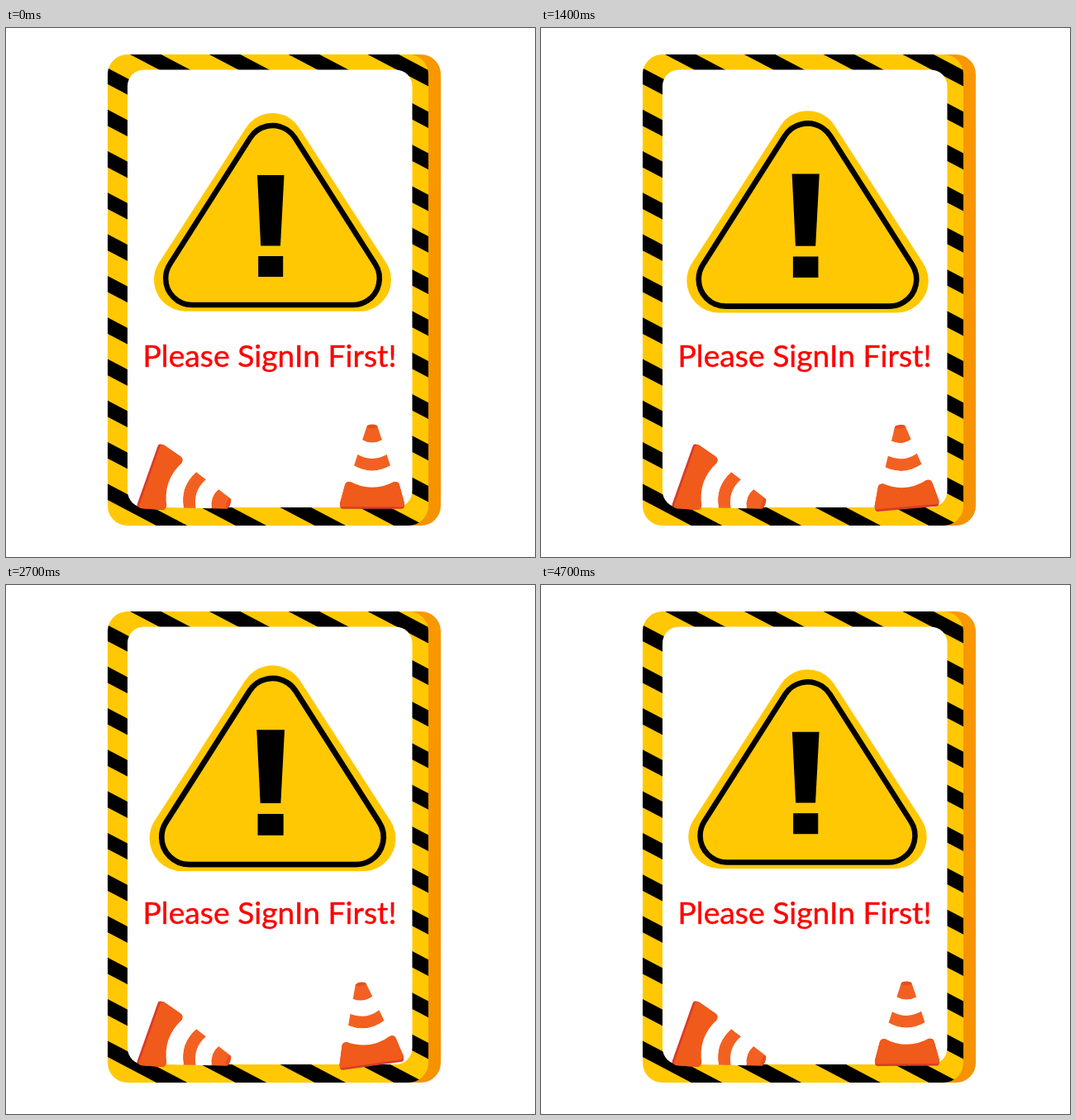
An HTML page with a canvas for the animation above (4.8 s loop, 640 by 640 pixels).

```html
<!DOCTYPE html>
<html lang="en">
<head>
<meta charset="utf-8">
<title>Please SignIn First!</title>
<style>
  html, body { margin: 0; width: 100%; height: 100%; overflow: hidden; background: #fff; }
  canvas { display: block; width: 640px; height: 640px; }
</style>
</head>
<body>
<canvas id="stage" width="640" height="640"></canvas>
<script>
const ctx = document.getElementById('stage').getContext('2d');
const YELLOW = '#ffc803', BLACK = '#000', ORANGE = '#f26122', DEEP = '#f05a1a', RED = '#d93a2b';
const LOOP = 4800, STEP = 100, BEAT = 1200;

// Cone tilt in degrees at each twelfth of a beat: a damped wobble.
const TILT = [0, -2, -5, -8, -9, -8, -1, 4.5, 4, -1.5, -2, -0.5];

function poly(points, color) {
  ctx.beginPath();
  points.forEach(([x, y]) => ctx.lineTo(x, y));
  ctx.closePath();
  ctx.fillStyle = color;
  ctx.fill();
}

function roundBox(x0, y0, x1, y1, r, color) {
  ctx.beginPath();
  ctx.roundRect(x0, y0, x1 - x0, y1 - y0, r);
  ctx.fillStyle = color;
  ctx.fill();
}

// Hazard bands slanting down across the whole board.
function bands() {
  const x0 = 123, x1 = 511, drop = (x1 - x0) * 0.525;
  for (let i = -5; i < 12; i++) {
    const a = 48.4 + i * 50.3, b = a + 19.7;
    poly([[x0, a], [x1, a + drop], [x1, b + drop], [x0, b]], BLACK);
  }
}

function board() {
  const side = ctx.createLinearGradient(0, 32, 0, 602);
  side.addColorStop(0, '#f99800');
  side.addColorStop(1, '#f59200');
  roundBox(400, 32, 526, 602, 24, side);
  roundBox(123, 32, 511, 602, 24, YELLOW);
  ctx.save();
  ctx.clip();
  bands();
  ctx.restore();
  roundBox(147, 50.5, 491.5, 580, 20, '#fff');
}

// Triangle with round corners, symmetric about x = 0.
function roundTriangle(top, base, half, r) {
  const len = Math.hypot(half, base - top);
  const tilt = Math.atan2(-half / len, (base - top) / len);
  ctx.beginPath();
  ctx.arc(0, top, r, Math.PI - tilt, tilt);
  ctx.arc(half, base, r, tilt, Math.PI / 2);
  ctx.arc(-half, base, r, Math.PI / 2, Math.PI - tilt);
  ctx.closePath();
}

function sign(scale) {
  ctx.save();
  ctx.translate(322.5, 251);
  ctx.scale(scale, scale);
  roundTriangle(-110, 53.7, 105.5, 38);
  ctx.fillStyle = YELLOW;
  ctx.fill();
  roundTriangle(-101, 52, 97.3, 32);
  ctx.lineWidth = 6.5;
  ctx.strokeStyle = BLACK;
  ctx.stroke();
  poly([[-18.5, -73], [14, -73], [9.5, 12.5], [-14.3, 12.5]], BLACK);
  poly([[-17.3, 25], [12.7, 25], [12.7, 50], [-17.3, 50]], BLACK);
  ctx.restore();
}

const coneHalf = y => 6.5 + (y + 99) * 22.5 / 69;

function coneBand(y0, y1, color) {
  const a = coneHalf(y0), b = coneHalf(y1);
  ctx.beginPath();
  ctx.moveTo(-a, y0);
  ctx.quadraticCurveTo(0, y0 + a * 0.56, a, y0);
  ctx.lineTo(b, y1);
  ctx.quadraticCurveTo(0, y1 + b * 0.56, -b, y1);
  ctx.closePath();
  ctx.fillStyle = color;
  ctx.fill();
}

function coneBase(color, bottom) {
  ctx.beginPath();
  ctx.moveTo(-28, -32);
  ctx.quadraticCurveTo(-32, -32, -33, -28);
  ctx.lineTo(-39, -6);
  ctx.quadraticCurveTo(-39.5, bottom, -36, bottom);
  ctx.lineTo(36, bottom);
  ctx.quadraticCurveTo(39.5, bottom, 39, -6);
  ctx.lineTo(33, -28);
  ctx.quadraticCurveTo(32, -32, 28, -32);
  ctx.closePath();
  ctx.fillStyle = color;
  ctx.fill();
}

// The origin of a cone is the middle of its underside.
function cone(x, y, degrees, scale) {
  ctx.save();
  ctx.translate(x, y);
  ctx.rotate(degrees * Math.PI / 180);
  ctx.scale(scale, scale);
  coneBase(RED, 0.8);
  coneBase(DEEP, -1.8);
  coneBand(-99, -82.5, ORANGE);
  coneBand(-82.5, -65, '#fff');
  coneBand(-65, -51.5, ORANGE);
  coneBand(-51.5, -33, '#fff');
  ctx.beginPath();
  ctx.ellipse(0, -99, 6.5, 2.4, 0, 0, Math.PI * 2);
  ctx.fillStyle = '#e4501f';
  ctx.fill();
  ctx.restore();
}

function caption() {
  const text = 'Please SignIn First!', face = 'px Lato, "Open Sans", sans-serif';
  ctx.font = '100' + face;
  ctx.font = 100 * 307 / ctx.measureText(text).width + face;
  ctx.textAlign = 'center';
  ctx.fillStyle = ctx.strokeStyle = '#fe0000';
  ctx.lineWidth = 0.4;
  ctx.fillText(text, 319, 410);
  ctx.strokeText(text, 319, 410);
}

// The beat drags by up to 100 ms around 3300 ms.
function beatAt(t) {
  const lag = t < 3300 ? (t - 2700) / 600 : (4100 - t) / 800;
  return (t - 100 * Math.max(0, lag)) / BEAT;
}

function tiltAt(beat) {
  const p = (beat % 1) * 12, i = Math.floor(p);
  const a = TILT[i % 12], b = TILT[(i + 1) % 12];
  return a + (b - a) * (p - i);
}

function draw(t) {
  const beat = beatAt(t);
  const swell = (1 - Math.cos(beat * Math.PI * 2)) / 2;
  ctx.fillStyle = '#fff';
  ctx.fillRect(0, 0, 640, 640);
  board();
  sign(1 + 0.076 * swell);
  caption();
  cone(172, 541, 109.5, 1.04);
  cone(443, 581, tiltAt(beat), 1);
}

const start = performance.now();
function tick() {
  const t = (performance.now() - start) % LOOP;
  draw(Math.floor(t / STEP) * STEP);
  requestAnimationFrame(tick);
}
tick();
</script>
</body>
</html>
```
